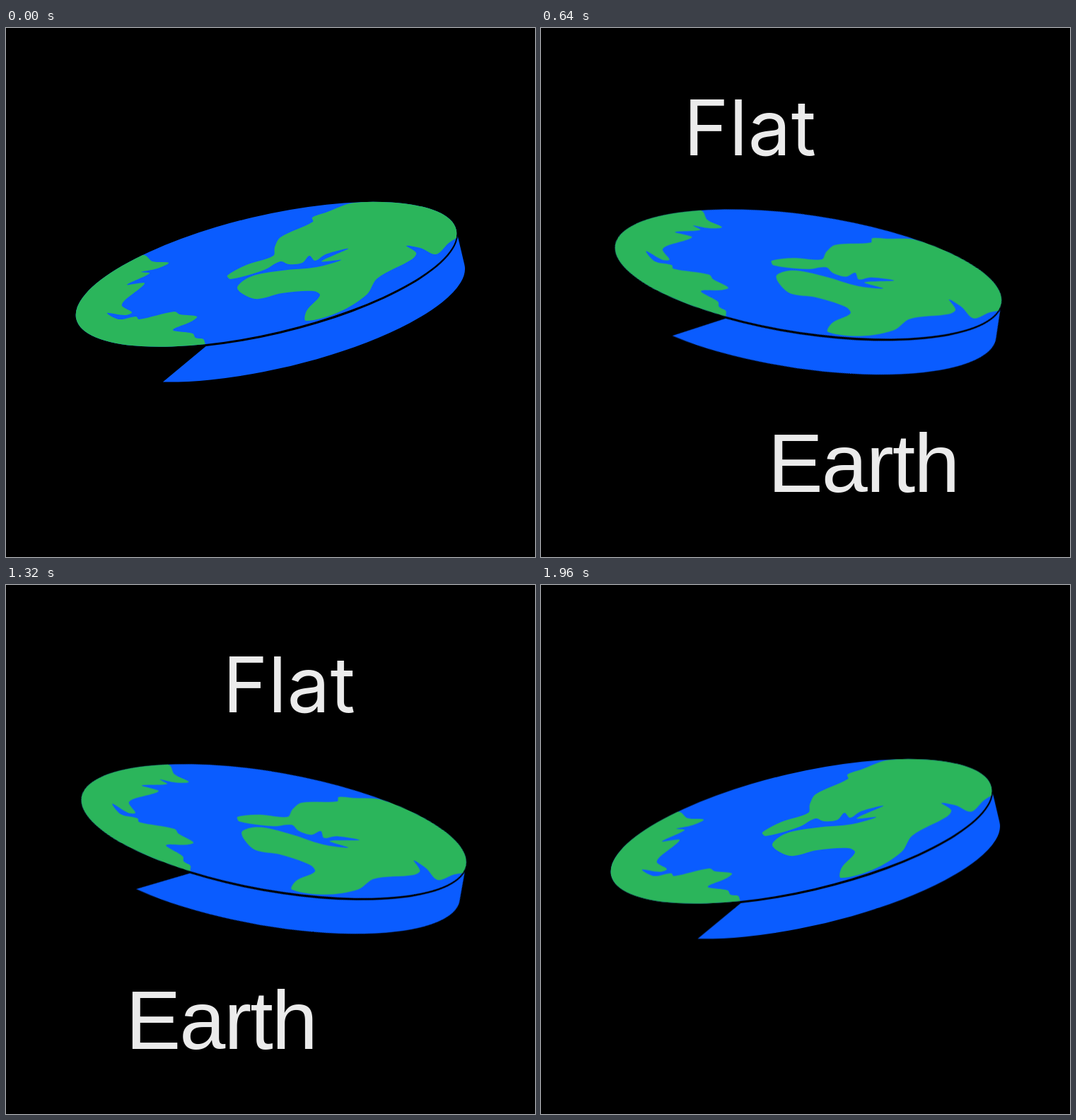
Animation, 748 px wide and 748 px high, one loop 2000 ms. Source, as an HTML page:

```html
<!DOCTYPE html>
<html lang="en">
<head>
<meta charset="utf-8">
<title>Flat Earth</title>
<style>
  html, body { margin: 0; width: 100%; height: 100%; overflow: hidden; background: #000; }
  svg { display: block; width: 100%; height: 100%; }
  .sea { fill: #0a5cff; }
  .land { fill: #2bb55b; }
  text { fill: #ebebeb; }

  #earth {
    transform-origin: 374px 374px;
    animation: tilt 2s cubic-bezier(.35, 0, .65, 1) infinite;
  }
  @keyframes tilt {
    0%, 100% { transform: rotate(0deg); }
    50% { transform: rotate(30.6deg); }
  }

  #top {
    font: 400 108px Inter, "Liberation Sans", sans-serif;
    letter-spacing: .5px;
    animation: slide-right 2s infinite;
  }
  @keyframes slide-right {
    0% { transform: translateX(-500px); animation-timing-function: cubic-bezier(.32, 0, .35, 1); }
    50% { transform: translateX(0); animation-timing-function: cubic-bezier(.76, 0, .68, 1); }
    100% { transform: translateX(500px); }
  }

  #bottom {
    font: 400 117px "Liberation Sans", Arial, sans-serif;
    letter-spacing: -2px;
    animation: slide-left 2s infinite;
  }
  @keyframes slide-left {
    0% { transform: translateX(540px); animation-timing-function: cubic-bezier(.33, 0, .4, 1); }
    50% { transform: translateX(0); animation-timing-function: cubic-bezier(.56, 0, .71, 1); }
    100% { transform: translateX(-540px); }
  }
</style>
</head>
<body>
<svg viewBox="0 0 748 748">
  <clipPath id="rim">
    <ellipse cx="374" cy="347.6" rx="276" ry="82.8" transform="rotate(-13.25 374 374)"/>
  </clipPath>
  <g id="earth">
    <g transform="rotate(-13.25 374 374)">
      <path class="sea" d="M196.9 462.3A276 83 0 0 0 650 398.6V350H420L300 410.9Z"/>
      <ellipse cx="374" cy="348.6" rx="277.5" ry="85"/>
      <ellipse class="sea" cx="374" cy="347.6" rx="276" ry="82.8"/>
    </g>
    <g class="land" clip-path="url(#rim)">
      <path id="east"/>
      <path id="west"/>
    </g>
  </g>
  <text id="top" x="268" y="180">Flat</text>
  <text id="bottom" x="238.4" y="656">Earth</text>
</svg>
<script>
  // Coastlines as x,y pairs; each closes outside the rim.
  const coasts = {
    east: `493,247 452,261 433,268 434,274 388,296 380,310 378,322 340,335 313,350
      318,355 365,342 388,330 400,334 419,332 429,322 437,329 452,320 484,312
      446,330 474,328 440,338 390,343 345,352 327,368 352,383 390,375 435,372
      444,378 425,400 424,414 470,402 510,377 525,354 574,327 580,318 566,308
      586,311 608,320 626,304 645,290 665,240`,
    west: `195,321 207,330 230,332 214,340 191,345 203,347 171,363 196,361 167,386
      164,393 178,402 168,406 143,403 160,412 184,408 188,412 238,401 246,405
      270,408 262,415 236,427 264,432 268,438 280,441 280,475 70,475 80,321`
  };

  const gap = (a, b) => Math.hypot(a[0] - b[0], a[1] - b[1]);

  // Curve handle at p toward `to`, scaled to the length of that side.
  function handle(p, from, to) {
    const w = gap(p, to) / (gap(p, to) + gap(p, from)) / 3;
    return p.map((v, k) => (v + (to[k] - from[k]) * w).toFixed(1));
  }

  // Smooth closed curve passing through every point.
  function smooth(list) {
    const pts = list.trim().split(/\s+/).map(p => p.split(",").map(Number));
    const at = i => pts[(i + pts.length) % pts.length];
    return "M" + pts[0] + pts.map((p, i) => {
      const next = at(i + 1);
      return `C${handle(p, at(i - 1), next)} ${handle(next, at(i + 2), p)} ${next}`;
    }).join("") + "Z";
  }

  for (const id in coasts) document.getElementById(id).setAttribute("d", smooth(coasts[id]));
</script>
</body>
</html>
```
